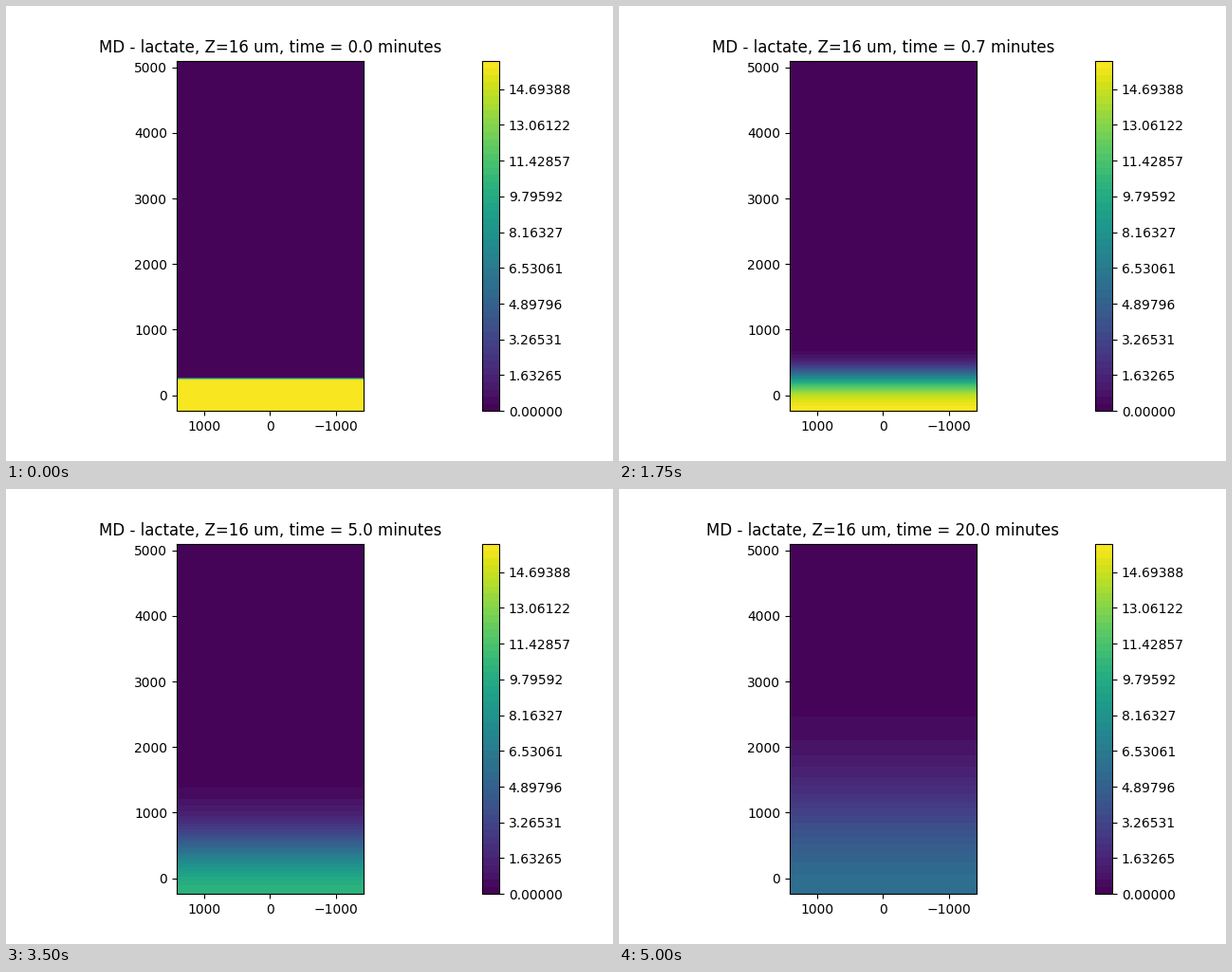
Animation of 640 by 480 pixels, one loop 5.25 s. Source, as a matplotlib script:

```python
import math

import matplotlib.pyplot as plt
import numpy as np
from matplotlib.animation import FuncAnimation
from matplotlib.ticker import MultipleLocator

PEAK = 16.0        # starting concentration
DIFFUSION = 30000  # um^2 per minute
FLOOR = -256       # no-flux wall
DEPTH = 512        # thickness of the loaded layer

x = np.array([-1424, 1424])
y = np.arange(-240, 5105, 32)
levels = np.linspace(0, PEAK, 50)
# tenths of a minute, then whole minutes, then a jump to twenty
times = [i / 10 for i in range(11)] + list(range(2, 11)) + [20]

erf = np.vectorize(math.erf)


def concentration(t):
    """Layer diffusing upward from a reflecting wall."""
    spread = max(2 * math.sqrt(DIFFUSION * t), 1e-9)
    u = y - FLOOR
    c = PEAK / 2 * (erf((DEPTH - u) / spread) + erf((DEPTH + u) / spread))
    return np.clip(c, 0, PEAK)


def draw_field(t):
    field = np.column_stack([concentration(t)] * len(x))
    return ax.contourf(x, y, field, levels=levels, cmap="viridis")


plt.rcParams["font.family"] = "DejaVu Sans"
fig, ax = plt.subplots(figsize=(6.4, 4.8), dpi=100)
contours = draw_field(0)
bar = fig.colorbar(contours, ax=ax, ticks=levels[::5], format="%.5f")
bar.minorticks_off()
ax.set_aspect("equal", adjustable="box", anchor="C")
ax.set_xlim(x[-1], x[0])
ax.set_ylim(y[0], y[-1])
ax.xaxis.set_major_locator(MultipleLocator(1000))
ax.yaxis.set_major_locator(MultipleLocator(1000))
title = ax.set_title("")


def update(i):
    global contours
    contours.remove()
    contours = draw_field(times[i])
    title.set_text(f"MD - lactate, Z=16 um, time = {times[i]:.1f} minutes")
    return contours, title


anim = FuncAnimation(fig, update, frames=len(times), interval=250,
                     init_func=lambda: (), repeat=True, repeat_delay=0)
plt.show()
```
